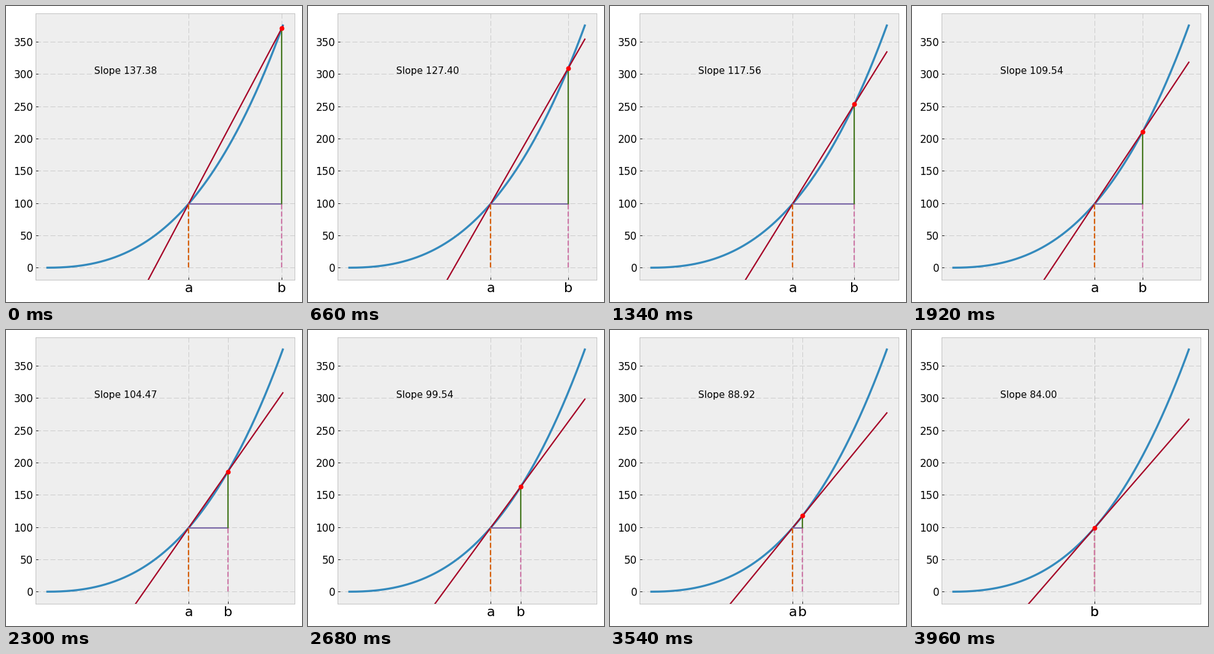
A matplotlib script for the animation above (5 s loop, 480 by 480 pixels).

```python
import numpy as np
import matplotlib.pyplot as plt
from matplotlib.animation import FuncAnimation

plt.style.use("bmh")

A, B_START, STEP = 3.0, 4.98, 0.01
MOVE_FRAMES, FRAMES, INTERVAL = 198, 250, 20


def f(x):
    return 2 * x**3 + 5 * x**2


def secant_slope(b):
    """(f(b) - f(A)) / (b - A), which also holds at b = A."""
    return 2 * (b * b + A * b + A * A) + 5 * (b + A)


fig = plt.figure(figsize=(6, 6), dpi=80)
ax = fig.add_axes([0.1, 0.075, 0.875, 0.9])
ax.set_xlim(-0.25, 5.25)
ax.set_ylim(-18.75, 393.75)
ax.tick_params(axis="y", labelsize=15)
ax.tick_params(axis="x", labelsize=20)
ax.grid(True, linestyle=(0, (14.8, 6.4)))

x = np.linspace(0, 5, 200)
ax.plot(x, f(x), lw=3)
secant, = ax.plot([], [])
run, = ax.plot([], [])
rise, = ax.plot([], [])
ax.plot([A, A], [0, f(A)], "--")
drop, = ax.plot([], [], "--")
dot, = ax.plot([], [], "ro")
label = ax.text(1, 300, "", fontsize=14)


def draw(i):
    b = A + STEP * (MOVE_FRAMES - min(i, MOVE_FRAMES))
    slope = secant_slope(b)
    ends = np.array([0, 5])
    secant.set_data(ends, f(A) + slope * (ends - A))
    run.set_data([A, b], [f(A), f(A)])
    rise.set_data([b, b], [f(A), f(b)])
    drop.set_data([b, b], [0, f(A)])
    dot.set_data([b], [f(b)])
    label.set_text(f"Slope {slope:.2f}")
    ax.set_xticks([A, b], ["a", "b"])
    return secant, run, rise, drop, dot, label


anim = FuncAnimation(fig, draw, frames=FRAMES, interval=INTERVAL,
                     init_func=lambda: draw(0), repeat=True, repeat_delay=0)
plt.show()
```
